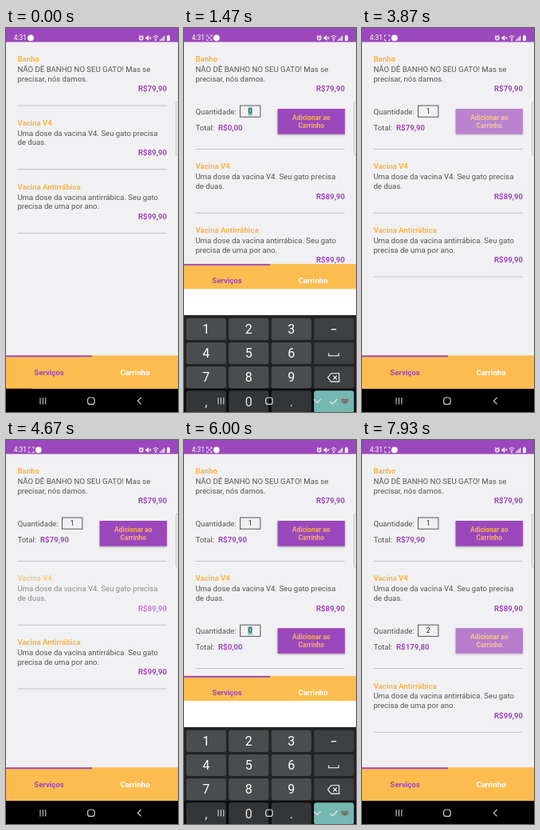
Animation, 216 px wide and 480 px high, one loop 8000 ms. Source, as an HTML page:

```html
<!DOCTYPE html>
<html lang="pt-BR">
<head>
<meta charset="utf-8">
<title>Serviços</title>
<style>
html, body { margin: 0; width: 100%; height: 100%; overflow: hidden; background: #000; }
svg { display: block; width: 100vw; height: 100vh; }
text { font: 9.6px Roboto, sans-serif; fill: #555; }
.bold { font-weight: 700; }
.orange { fill: #f8b544; }
.purple { fill: #9c48bd; }
.white { fill: #fff; }
.line { fill: none; stroke: #fff; }
.small { font-size: 8.4px; }
.key { font-size: 16px; fill: #fff; }
.mid { text-anchor: middle; }
.end { text-anchor: end; }
</style>
</head>
<body>
<svg id="stage" viewBox="0 0 216 480"></svg>
<script>
const stage = document.getElementById('stage');
const LOOP = 8000, FRAME = 200 / 3;
const EXTRA = 54.4, PITCH = 79.75;

function add(parent, tag, attrs = {}, content) {
  const node = document.createElementNS('http://www.w3.org/2000/svg', tag);
  for (const name in attrs) node.setAttribute(name, attrs[name]);
  if (content !== undefined) node.textContent = content;
  parent.appendChild(node);
  return node;
}
const group = (parent, attrs) => add(parent, 'g', attrs);
const rect = (parent, x, y, width, height, fill, more) =>
  add(parent, 'rect', { x, y, width, height, fill, ...more });
const label = (parent, x, y, content, cls = '') =>
  add(parent, 'text', { x, y, class: cls }, content);
const line = (parent, d, width = 1) =>
  add(parent, 'path', { d, class: 'line', 'stroke-width': width });
const show = (node, on) => node.setAttribute('visibility', on ? 'inherit' : 'hidden');
const move = (node, y) => node.setAttribute('transform', `translate(0 ${y})`);
const fade = (node, value) => node.setAttribute('opacity', value);
const setText = (node, value) => { if (node.textContent !== value) node.textContent = value; };

const progress = (t, start, length) => Math.min(1, Math.max(0, (t - start) / length));
const within = (t, [start, stop]) => t >= start && t < stop;
// Touch feedback: fades to 20 % while held, returns after release.
const touch = (t, press, release) =>
  t < release ? 1 - 0.8 * progress(t, press, 150) : 0.2 + 0.8 * progress(t, release, 250);

const services = [
  { name: 'Banho', text: ['NÃO DÊ BANHO NO SEU GATO! Mas se', 'precisar, nós damos.'],
    price: 'R$79,90', tap: [333, 600], focus: [1270, 3000], typed: 2000,
    count: '1', total: 'R$79,90', order: [3803, 4130] },
  { name: 'Vacina V4', text: ['Uma dose da vacina V4. Seu gato precisa', 'de duas.'],
    price: 'R$89,90', tap: [4603, 4870], focus: [5530, 7270], typed: 6530,
    count: '2', total: 'R$179,80', order: [7870, 8200] },
  { name: 'Vacina Antirrábica', text: ['Uma dose da vacina antirrábica. Seu gato', 'precisa de uma por ano.'],
    price: 'R$99,90' }
];
const keyboardTimes = [{ open: 1400, close: 3200 }, { open: 5930, close: 7330 }];
const keyPresses = { 1: [[1930, 2070]], 2: [[6470, 6600]], enter: [[2600, 2730], [7130, 7270]] };

function buildCard(service) {
  const root = group(stage);
  const head = group(root);
  label(head, 14.4, 42.3, service.name, 'bold orange');
  service.text.forEach((row, i) => label(head, 14.4, 55.2 + i * 11.5, row));
  label(head, 202, 79.4, service.price, 'bold purple end');
  const rule = rect(root, 14.4, 96.6, 187.4, 0.8, '#b9b9bd');
  const card = { ...service, root, head, rule };
  if (!service.tap) return card;

  card.form = group(root);
  label(card.form, 14.4, 107.8, 'Quantidade:');
  rect(card.form, 70.5, 97, 25.4, 14.2, 'none', { stroke: '#333', 'stroke-width': 0.8 });
  card.selection = rect(card.form, 80.3, 98.8, 5.6, 10.8, '#80cbc4');
  card.field = label(card.form, 83.1, 107.3, '0', 'small mid');
  card.field.style.fill = '#222';
  card.caret = rect(card.form, 86, 98.8, 1.1, 10.8, '#19a391');
  label(card.form, 14.4, 128.3, 'Total:');
  card.sum = label(card.form, 43, 128.3, 'R$0,00', 'bold purple');
  card.button = group(card.form);
  rect(card.button, 117.6, 101, 84.4, 31.6, '#9c48bd',
    { style: 'filter:drop-shadow(0 1px 1px rgba(0,0,0,.35))' });
  label(card.button, 159.8, 114.7, 'Adicionar ao', 'bold small orange mid');
  label(card.button, 159.8, 124.6, 'Carrinho', 'bold small orange mid');
  return card;
}

rect(stage, 0, 0, 216, 480, '#f1f0f2');
const cards = services.map(buildCard);

// Edge handle and status bar
rect(stage, 213.4, 92, 6, 67, '#e9e8eb', { rx: 2, stroke: '#b5b4b8', 'stroke-width': 0.7 });
rect(stage, 0, 0, 216, 17.5, '#9c48bd');
label(stage, 9.8, 15.3, '4:31', 'small white');
const capture = group(stage);
line(capture, 'M28.5 11v-2h2M33 9h2v2M35 13.5v2h-2M30.5 15.5h-2v-2', 0.8);
const captureMark = line(capture, 'M30 10.7l3.5 3.2M33.5 10.7l-3.5 3.2', 0.8);
const badge = add(stage, 'circle', { cx: 31, cy: 12.3, r: 3.9, class: 'white' });
const status = group(stage);
add(status, 'circle', { cx: 169.8, cy: 12.6, r: 2.3, class: 'line', 'stroke-width': 1.1 });
line(status, 'M167 10.2l1.5-1.2M172.6 10.2l-1.5-1.2M169.8 11.2v1.6h1', 0.8);
add(status, 'path', { d: 'M175.5 11h1.5l2.2-2v7l-2.2-2h-1.5z', class: 'white' });
line(status, 'M180 11l2.4 3M182.4 11l-2.4 3', 0.8);
line(status, 'M184.6 11q3.4-3 6.8 0M185.9 12.9q2.1-2 4.2 0', 0.9);
add(status, 'path', { d: 'M188 13.6l1.3 1.2-1.3 1.4-1.3-1.4z', class: 'white' });
for (let i = 0; i < 4; i++) rect(status, 193 + i * 1.7, 14.5 - i * 1.6, 1.1, 1.5 + i * 1.6, '#fff');
rect(status, 202, 9.5, 3.8, 6.5, '#fff', { rx: 0.6 });
rect(status, 203.1, 8.8, 1.6, 1, '#fff');

// Tab bar, at its resting place above the navigation bar
const tabs = group(stage);
rect(tabs, 0, 409.3, 216, 42, '#fcbc50');
rect(tabs, 0, 409.3, 108, 1.9, '#9c48bd');
label(tabs, 54, 433.6, 'Serviços', 'bold purple mid');
label(tabs, 162, 433.6, 'Carrinho', 'bold white mid');
const tabTrace = rect(tabs, 0, 450, 32, 1, '#c48d35');
const blank = rect(stage, 0, 326, 216, 126, '#fff');
rect(stage, 0, 451, 216, 29, '#000');

// Keyboard
const keyboard = group(stage);
rect(keyboard, 0, 326, 216, 125.5, '#0d0e0f');
const keys = {};
['1', '2', '3', 'minus', '4', '5', '6', 'space', '7', '8', '9', 'erase', ',', '0', '.', 'enter']
  .forEach((name, i) => {
    const x = 2.7 + (i % 4) * 53.5, y = 329.8 + Math.floor(i / 4) * 30.2;
    const color = name === 'enter' ? '#80cbc4' : i % 4 === 3 ? '#2c2e30' : '#393b3d';
    keys[name] = rect(keyboard, x, y, 50.2, 27.2, color, { rx: 3 });
    if (name.length === 1) label(keyboard, x + 25.1, y + 19.2, name, 'key mid');
  });
line(keyboard, 'M184.8 343.8h6.4', 1.3);
line(keyboard, 'M181.8 373.5v3.3h12.4v-3.3', 1.1);
line(keyboard, 'M180.6 404l4.2-5.2h10v10.4h-10zM187.4 401.6l4.6 4.8M192 401.6l-4.6 4.8', 1.1);
line(keyboard, 'M183.6 434l3 3 6-6.2', 1.3);

// Navigation icons
const nav = group(stage, { opacity: 0.8 });
line(nav, 'M43 462v8.4M46.4 462v8.4M49.8 462v8.4', 1.1);
rect(nav, 102.6, 462, 8.6, 8.4, 'none', { rx: 3, class: 'line', 'stroke-width': 1.2 });
const backIcon = line(nav, 'M169.6 462l-4.2 4.2 4.2 4.2', 1.2);
const hideIcons = group(nav);
line(hideIcons, 'M163.2 464.2l4.2 4.2 4.2-4.2', 1.2);
rect(hideIcons, 196.8, 462.5, 10.6, 7.2, '#999', { rx: 1 });
line(hideIcons, 'M198 464.6h8.4M198 466.4h8.4', 0.9).style.cssText = 'stroke:#000;stroke-dasharray:1 .8';
line(hideIcons, 'M199.8 468.3h4.8', 0.8).style.stroke = '#000';

function drawCards(t) {
  let offset = 0;
  cards.forEach((card, i) => {
    move(card.root, i * PITCH + offset);
    if (!card.tap) return;
    const open = t >= card.tap[1], typed = t >= card.typed, focused = within(t, card.focus);
    fade(card.head, touch(t, ...card.tap));
    show(card.form, open);
    move(card.rule, open ? EXTRA : 0);
    show(card.selection, open && focused && !typed);
    show(card.caret, open && focused && typed);
    setText(card.field, typed ? card.count : '0');
    setText(card.sum, typed ? card.total : 'R$0,00');
    fade(card.button, touch(t, ...card.order));
    if (open) offset += EXTRA;
  });
}

function drawKeyboard(t) {
  let shift = 0, alpha = 0, tabY = 0, resized = false;
  for (const { open, close } of keyboardTimes) {
    if (t < open || t >= close + 400) continue;
    const enter = progress(t, open, 270), leave = progress(t, close, 200);
    resized = t < close;
    shift = resized ? 60 * (1 - enter) ** 2 : 60 * leave ** 2;
    alpha = resized ? Math.min(1, 0.65 + enter) : 1 - leave;
    tabY = resized ? -125.3 + 42 * enter : 42 * (1 - progress(t, close + 130, 270));
  }
  move(tabs, tabY);
  move(keyboard, shift);
  fade(keyboard, alpha);
  show(blank, resized);
  show(hideIcons, resized);
  show(backIcon, !resized);
  for (const name in keyPresses)
    fade(keys[name], keyPresses[name].some(span => within(t, span)) ? 0.65 : 1);
  show(captureMark, t >= 930 && alpha + (t < 1400) > 0);
}

function draw(time) {
  const t = Math.round(Math.floor((time + 4) / FRAME) * FRAME / 10) * 10;
  drawCards(t);
  drawKeyboard(t);
  show(capture, t >= 600);
  badge.setAttribute('cx', t >= 600 ? 40.8 : 31);
  show(tabTrace, t < 70);
}

const began = performance.now();
function tick() {
  draw((performance.now() - began) % LOOP);
  requestAnimationFrame(tick);
}
tick();
</script>
</body>
</html>
```
